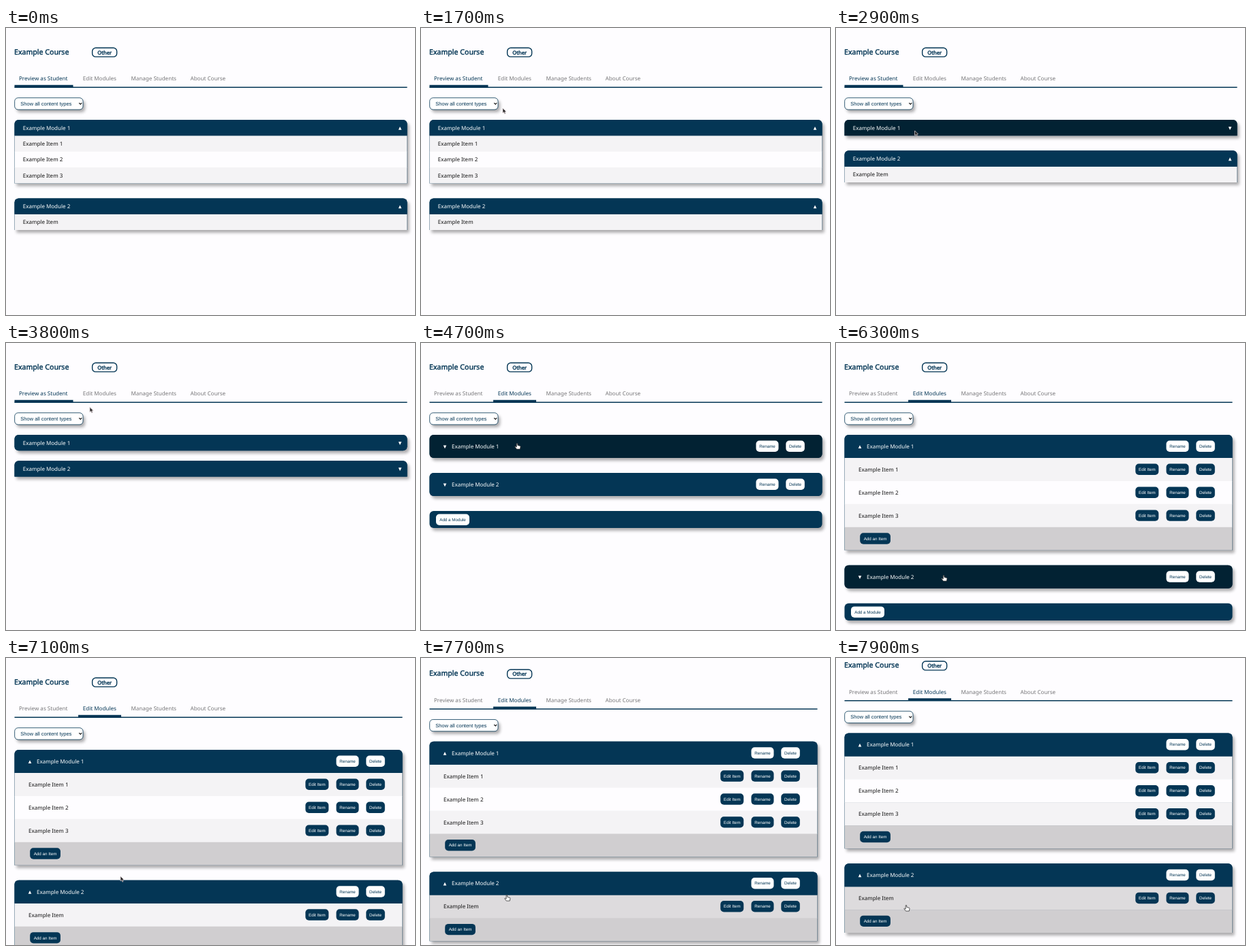
Animation of 600x422 px, one loop 8000 ms. Source, as an HTML page with a canvas:

```html
<!DOCTYPE html>
<html>
<head>
<meta charset="utf-8">
<style>
html, body { margin: 0; width: 600px; height: 422px; overflow: hidden; background: #fefdff; }
canvas { display: block; }
</style>
</head>
<body>
<canvas id="stage" width="600" height="422"></canvas>
<script>
const ctx = document.getElementById('stage').getContext('2d');
const NAVY = '#043655', HOVER = '#022233', PAGE = '#fefdff', STRIPE = '#f4f3f5',
  ROW_HOVER = '#dddbdd', FOOT = '#d0ced0';
const UI = '"Noto Sans", sans-serif', FORM = '"Liberation Sans", Arial, sans-serif';
const LEFT = 12.5, TOP = 135, PERIOD = 8000, EDIT_AT = 4000;

// Pointer path: time, x, y
const path = [
  [1500, 120, 107], [1700, 120, 118], [1900, 118, 140], [2700, 115.5, 151], [3000, 115.5, 151],
  [3400, 117, 186], [3550, 118, 183], [3800, 123, 94.5], [3950, 135, 78], [4200, 136, 76],
  [4700, 141, 147.5], [5500, 141, 147.5], [6100, 158, 341.5], [6600, 158, 341.5],
  [7100, 168, 321], [7400, 168, 321], [7900, 103, 363.5]
];

const ramp = (t, a, b) => Math.max(0, Math.min(1, (t - a) / (b - a)));
const ease = k => k * k * (3 - 2 * k);

function pointerAt(t) {
  if (t < path[0][0]) return null;
  const i = Math.max(1, path.findIndex(p => p[0] >= t));
  const [t0, x0, y0] = path[i - 1], [t1, x1, y1] = path[i];
  const k = ease(ramp(t, t0, t1));
  return { x: x0 + (x1 - x0) * k, y: y0 + (y1 - y0) * k };
}

function text(str, x, y, size, color, family = UI, weight = 0) {
  ctx.font = `${size}px ${family}`;
  ctx.fillStyle = ctx.strokeStyle = color;
  ctx.fillText(str, x, y);
  if (weight) {
    ctx.lineWidth = weight;
    ctx.strokeText(str, x, y);
  }
}

function box(x, y, w, h, color, radius = 0, shadow = false) {
  ctx.save();
  if (shadow) {
    ctx.shadowColor = 'rgba(0,0,0,.32)';
    ctx.shadowOffsetX = 3;
    ctx.shadowOffsetY = 4;
    ctx.shadowBlur = 4;
  }
  ctx.fillStyle = color;
  ctx.beginPath();
  ctx.roundRect(x, y, w, h, radius);
  ctx.fill();
  ctx.restore();
}

function outline(x, y, w, h, width) {
  ctx.strokeStyle = NAVY;
  ctx.lineWidth = width;
  ctx.beginPath();
  ctx.roundRect(x, y, w, h, 5);
  ctx.stroke();
}

function polygon(points, fill, stroke) {
  ctx.beginPath();
  points.forEach(p => ctx.lineTo(...p));
  ctx.closePath();
  ctx.fillStyle = fill;
  ctx.fill();
  if (stroke) {
    ctx.strokeStyle = stroke;
    ctx.lineWidth = 0.8;
    ctx.stroke();
  }
}

function button(label, x, y, w, light) {
  box(x, y - 8.2, w, 16.4, light ? '#fff' : NAVY, 5);
  ctx.textAlign = 'center';
  text(label, x + w / 2, y + 2.2, 6.25, light ? NAVY : '#fff', FORM);
  ctx.textAlign = 'left';
}

function rowButtons(right, y, isHeader) {
  if (!isHeader) button('Edit Item', right - 142.2, y, 34);
  button('Rename', right - 97, y, 33, isHeader);
  button('Delete', right - 53.2, y, 27.5, isHeader);
}

function pageTop(edit, right) {
  text('Example Course', LEFT - 0.5, 38.7, 10.6, NAVY, UI, 0.4);
  outline(126.6, 29.2, 36, 13.2, 1.4);
  text('Other', 134.3, 38.6, 7.6, NAVY, UI, 0.4);
  const active = edit ? 1 : 0;
  [['Preview as Student', 19], ['Edit Modules', 112.8], ['Manage Students', 183.5], ['About Course', 270.5]]
    .forEach(([label, x], i) => text(label, x, 77.4, 8.05, i === active ? NAVY : '#777779'));
  box(LEFT, 86.5, right - LEFT, 1.4, NAVY);
  if (edit) box(106, 83.8, 63, 3.6, NAVY);
  else box(LEFT, 83.8, 86, 3.6, NAVY);

  box(12.7, 102.7, 100.3, 17.3, '#fff', 5, true);
  outline(12.7, 102.7, 100.3, 17.3, 0.8);
  text('Show all content types', 21.3, 113.8, 7.5, NAVY, FORM);
  ctx.strokeStyle = '#111';
  ctx.lineWidth = 1.2;
  ctx.beginPath();
  ctx.moveTo(107.2, 110.2);
  ctx.lineTo(109.2, 112.2);
  ctx.lineTo(111.2, 110.2);
  ctx.stroke();
}

// Draws one module and returns the y where the next block begins
function drawModule(y, title, items, state, edit, right, pointer) {
  const rowH = edit ? 33.95 : 23.35, width = right - LEFT;
  const rows = items.length + (edit ? 1 : 0);
  const bodyH = rows * rowH * state.open;
  const over = (top, h) => pointer && pointer.y >= top && pointer.y < top + h;
  const corners = state.mounted ? [6, 6, 0, 0] : 6;
  box(LEFT, y, width, rowH + bodyH, NAVY, corners, true);
  box(LEFT, y, width, rowH, over(y, rowH) ? HOVER : NAVY, corners);

  const mid = y + rowH / 2;
  text(title, edit ? 45 : 24.8, mid + 3, 8, '#fff');
  const ax = edit ? 35 : right - 10.5, ay = mid + 0.8, dir = state.up ? 1 : -1;
  polygon([[ax - 2.3, ay + 2.3 * dir], [ax + 2.3, ay + 2.3 * dir], [ax, ay - 2.5 * dir]], '#fff');
  if (edit) rowButtons(right, mid - 0.2, true);

  ctx.save();
  ctx.beginPath();
  ctx.rect(LEFT, y + rowH, width, bodyH);
  ctx.clip();
  items.forEach((item, i) => {
    const top = y + rowH * (i + 1), center = top + rowH / 2;
    const hovered = edit && over(top, Math.min(rowH, y + rowH + bodyH - top));
    box(LEFT, top, width, rowH + 0.5, hovered ? ROW_HOVER : i % 2 ? PAGE : STRIPE);
    text(item, edit ? 33 : 24.8, center + 3, 8, '#111');
    if (edit) rowButtons(right, center - 0.2);
  });
  if (edit) {
    const top = y + rowH * rows;
    box(LEFT, top, width, rowH + 0.5, FOOT);
    button('Add an Item', 35.2, top + rowH / 2 - 0.3, 44.7);
  }
  ctx.restore();
  return y + rowH + bodyH + (edit || state.mounted ? 22 : 14.8);
}

function drawPointer({ x, y }, hand) {
  ctx.save();
  ctx.translate(x, y);
  ctx.lineJoin = 'round';
  if (hand) {
    polygon([[-0.8, 0.2], [0.6, 0.2], [0.9, 3], [4.6, 3.9], [5, 5], [4.3, 8.6], [-0.6, 8.6],
      [-3.2, 5.2], [-2.6, 4.5], [-0.8, 5.6]], '#fff', '#333');
  } else {
    polygon([[0, 0], [0, 7], [1.6, 5.6], [2.8, 8.2], [4, 7.6], [2.9, 5.2], [5, 5]], '#222', '#d0c4c8');
  }
  ctx.restore();
}

function draw(t) {
  const edit = t >= EDIT_AT;
  const pointer = pointerAt(t);
  const scroll = 24.5 * ease(ramp(t, 7500, 7900));
  const first = edit
    ? { open: ease(ramp(t, 4800, 5100)), mounted: t >= 4800, up: t >= 4800 }
    : { open: 1 - ramp(t, 2700, 2900), mounted: t < 3000, up: t < 2800 };
  const second = edit
    ? { open: ease(ramp(t, 6500, 6800)), mounted: t >= 6500, up: t >= 6500 }
    : { open: 1 - ramp(t, 3500, 3700), mounted: t < 3900, up: t < 3600 };
  // The scrollbar narrows the page once the first module is open
  const right = edit && first.open === 1 ? 581.5 : 588.5;
  const local = pointer && { x: pointer.x, y: pointer.y + scroll };

  ctx.fillStyle = PAGE;
  ctx.fillRect(0, 0, 600, 422);
  ctx.save();
  ctx.translate(0, -scroll);
  pageTop(edit, right);
  let y = drawModule(TOP, 'Example Module 1', ['Example Item 1', 'Example Item 2', 'Example Item 3'],
    first, edit, right, local);
  y = drawModule(y, 'Example Module 2', ['Example Item'], second, edit, right, local);
  if (edit) {
    box(LEFT, y, right - LEFT, 25.2, NAVY, 6, true);
    button('Add a Module', 22, y + 12.9, 49, true);
  }
  ctx.restore();

  if (pointer) {
    const onTab = pointer.y > 66 && pointer.y < 86;
    const onModule = edit && local.y >= TOP && !(local.y > 305 && local.y < 327);
    drawPointer(pointer, onTab || onModule);
  }
}

ctx.textRendering = 'geometricPrecision';
(function frame() {
  draw(Math.floor(performance.now() % PERIOD / 100) * 100);
  requestAnimationFrame(frame);
})();
</script>
</body>
</html>
```
